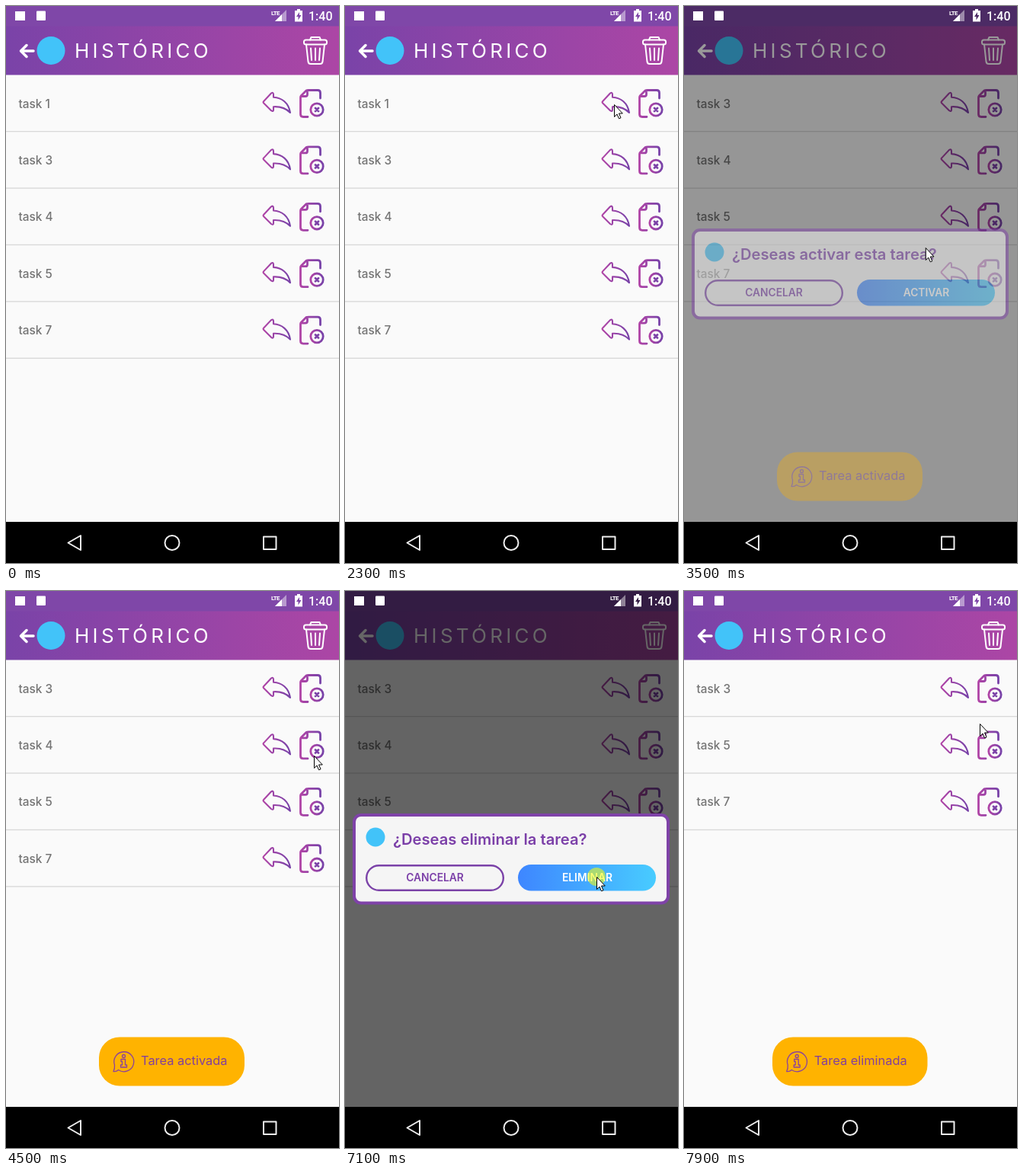
Animation, 437 px wide and 731 px high, one loop 8 s. Source, as an HTML page:

```html
<!DOCTYPE html>
<html lang="es">
<head>
<meta charset="utf-8">
<title>Histórico</title>
<style>
html, body { margin: 0; width: 100%; height: 100%; overflow: hidden; background: #fafafa; }
svg { display: block; width: 100vw; height: 100vh; }
text { font-family: Inter, "Open Sans", sans-serif; }
.line { fill: none; stroke-linecap: round; stroke-linejoin: round; }
.btn { font-size: 13.8px; font-weight: 600; text-anchor: middle; }
</style>
</head>
<body>
<svg viewBox="0 0 437 731">
  <defs>
    <linearGradient id="bar"><stop stop-color="#7a43a8"/><stop offset="1" stop-color="#ac46a5"/></linearGradient>
    <linearGradient id="blue"><stop stop-color="#3e86ff"/><stop offset="1" stop-color="#48ccff"/></linearGradient>
    <linearGradient id="ink"><stop stop-color="#b044a6"/><stop offset="1" stop-color="#7842a8"/></linearGradient>
    <g id="icons" class="line" stroke="url(#ink)">
      <path stroke-width="2.100" d="M338 125.200L348 114.500Q351 112.500 351 116.500V119.700C362 120.200 371 127.200 373 140C367 133.700 360 131.700 351 132.200V136.200Q351 139.200 348 137.200L338.500 127.700Q337 126.200 338 125.200Z"/>
      <path stroke-width="2.800" d="M396 145.500H390Q386.500 145.500 386.500 142V120Q386.500 118.500 387.500 117.500L394 111Q395 110.500 397 110.500H409Q412.500 110.500 412.500 114V121M395.500 111V116Q395.500 118.500 393 118.500H387"/>
      <circle cx="408" cy="136" r="8.200" stroke-width="2.800"/>
      <path stroke="#7c42a8" stroke-width="2.800" d="M406 134l4 4m0-4l-4 4"/>
    </g>
  </defs>

  <rect width="437" height="731" fill="#fafafa"/>
  <rect width="437" height="27" fill="#7f47a8"/>
  <rect y="26.500" width="437" height="64" fill="url(#bar)"/>

  <text x="90" y="68" font-size="26" letter-spacing="4.300" fill="#fff">HISTÓRICO</text>
  <path class="line" stroke="#fff" stroke-width="3.500" d="M36 59H20M27 51.500L19.500 59L27 66.500"/>
  <circle cx="59" cy="58.500" r="18.500" fill="#42c3f9"/>
  <g class="line" stroke="#fff" stroke-width="2">
    <rect x="391" y="44.500" width="30" height="6" rx="2.500"/>
    <path d="M399 44.500L400.500 41H411.500L413 44.500M394 50.500L396.500 73Q397 76 400 76H412Q415 76 415.500 73L418 50.500M400 55.500L401 71M406 55.500V71M412 55.500L411 71"/>
  </g>

  <g id="list"></g>
  <rect id="dim" width="437" height="677"/>

  <!-- status icons stay bright above the dimming -->
  <g fill="#fff">
    <rect x="12" y="7" width="13" height="12"/>
    <rect x="40" y="6.500" width="12" height="12.500" rx="1"/>
    <text x="348" y="12" letter-spacing="-.8" style="font:bold 8px Roboto,sans-serif">LTE</text>
    <path opacity=".45" d="M353 20L368 5V20Z"/>
    <path d="M353 20L362 11V20Z"/>
    <path fill-rule="evenodd" d="M382 4h4v2h3v14.500h-10V6h3ZM385 8l-4 6h2.500v4.500l4-6.500H385Z"/>
    <text x="397" y="19" style="font:500 16px Roboto,sans-serif">1:40</text>
  </g>

  <g id="dialog">
    <rect x="12" y="294" width="412" height="115.500" rx="9" fill="#f5f5f5" stroke="#7f42a8" stroke-width="4"/>
    <circle cx="40" cy="323" r="12.500" fill="#42c3f9"/>
    <text id="ask" x="63" y="333" font-size="20.200" font-weight="600" fill="#7b3fa8"></text>
    <rect x="28.200" y="360.200" width="179.600" height="32.600" rx="16.300" fill="none" stroke="#7b42a8" stroke-width="2.400"/>
    <text class="btn" x="118" y="381" fill="#7b3fa8">CANCELAR</text>
    <rect id="fill" x="227" y="359" width="181" height="34.500" rx="17.200"/>
    <text id="verb" class="btn" x="318" y="381" fill="#fff"></text>
  </g>

  <g id="toast">
    <rect id="pill" y="585.500" height="64" rx="27" fill="#ffb300"/>
    <g id="note">
      <g class="line" stroke="#8b429c" stroke-width="1.300">
        <path d="M142.500 622A13 13 0 1 1 147.500 628.500Q145 631 141 630.500Q143 627 142.500 622Z"/>
        <circle cx="154.500" cy="610.500" r="2"/>
        <path d="M151 614.500h5.500v7.500h2v3h-8v-3h2v-4.500h-1.500Z"/>
      </g>
      <text id="msg" x="177" y="622" font-size="16.400" fill="#83409c"></text>
    </g>
  </g>

  <rect y="677" width="437" height="54"/>
  <g class="line" stroke="#eee" stroke-width="2">
    <path d="M81.500 704.500L98 695V714Z"/>
    <circle cx="218" cy="704.500" r="9.500"/>
    <rect x="338" y="696.500" width="16.500" height="16.500"/>
  </g>

  <g id="cursor">
    <circle id="tap" r="12" fill="#ff0" opacity=".55"/>
    <path fill="#fff" stroke="#000" d="M.5.5V16.500L4 13L6.500 18.800L9 17.800L6.500 12H11.300Z"/>
  </g>
</svg>
<script>
const $ = id => document.getElementById(id);
const LOOP = 8000, STEP = 100;

const steps = [
  { open: 2300, press: 3300, ask: '¿Deseas activar esta tarea?', verb: 'ACTIVAR',
    msg: 'Tarea activada', x: 122, w: 191, shift: 0, out: 5400, task: 1 },
  { open: 5400, press: 7100, ask: '¿Deseas eliminar la tarea?', verb: 'ELIMINAR',
    msg: 'Tarea eliminada', x: 116, w: 203.5, shift: -6.3, out: 9000, task: 4 }
];
const taps = [2200, 3400, 5300, 7100];

// time, x, y of the pointer tip
const path = [
  [500, 335, 608], [700, 285, 530], [1000, 237, 390], [1300, 251, 267], [1400, 251, 226],
  [1500, 251, 226], [1800, 300, 168], [2100, 353, 129], [2400, 353, 129], [3000, 307, 377],
  [3400, 307, 377], [3800, 346, 137], [3900, 346, 137], [4300, 410, 209], [4500, 404, 216],
  [4800, 394, 204], [4900, 401, 207], [5500, 401, 207], [6100, 330, 375], [7300, 330, 375],
  [7900, 388, 174]
];

const rows = [1, 3, 4, 5, 7].map(n => {
  const g = document.createElementNS('http://www.w3.org/2000/svg', 'g');
  g.innerHTML = `<text x="16.500" y="133.700" font-size="15.400" font-weight="500" fill="#747474">task ${n}</text>
    <use href="#icons"/><rect y="164" width="437" height="1.300" fill="#d8d8d8"/>`;
  $('list').append(g);
  return { n, g };
});

const ramp = (t, a, b) => Math.min(1, Math.max(0, (t - a) / (b - a)));
const set = (id, key, value) => $(id).setAttribute(key, value);
const move = (node, x, y) => node.setAttribute('transform', `translate(${x} ${y})`);

function pointer(t) {
  const i = path.findIndex(p => p[0] > t);
  if (i < 0) return path[path.length - 1].slice(1);
  if (i === 0) return path[0].slice(1);
  const [t0, x0, y0] = path[i - 1], [t1, x1, y1] = path[i];
  const u = ramp(t, t0, t1);
  return [x0 + (x1 - x0) * u, y0 + (y1 - y0) * u];
}

function draw(t) {
  const done = steps.filter(s => t >= s.press + 200);
  let y = 0;
  for (const { n, g } of rows) {
    const gone = done.some(s => s.task === n);
    g.style.display = gone ? 'none' : '';
    if (!gone) { move(g, 0, y); y += 74.4; }
  }

  const s = steps[t < 4500 ? 0 : 1], close = s.press + 100;
  const show = 1 - (1 - ramp(t, s.open, s.open + 270)) ** 2;
  set('dialog', 'opacity', show * (1 - ramp(t, close, close + 200)));
  set('dim', 'opacity', 0.6 * ramp(t, s.open, s.open + 430) * (1 - ramp(t, close, close + 300)));
  $('ask').textContent = s.ask;
  $('verb').textContent = s.verb;
  set('fill', 'fill', t >= s.press ? 'url(#blue)' : 'url(#bar)');

  const note = steps[t < 7000 ? 0 : 1], start = note.press + 100;
  set('toast', 'opacity', ramp(t, start, start + 300) * (1 - ramp(t, note.out, note.out + 230)));
  set('pill', 'x', note.x);
  set('pill', 'width', note.w);
  $('msg').textContent = note.msg;
  move($('note'), note.shift, 0);

  const [px, py] = pointer(t);
  move($('cursor'), px, py);
  $('cursor').style.display = t < 500 ? 'none' : '';
  $('tap').style.display = taps.some(a => t >= a && t < a + 100) ? '' : 'none';
}

const began = performance.now();
function frame() {
  const t = (performance.now() - began) % LOOP;
  draw(Math.floor(t / STEP) * STEP);
  requestAnimationFrame(frame);
}
frame();
</script>
</body>
</html>
```
